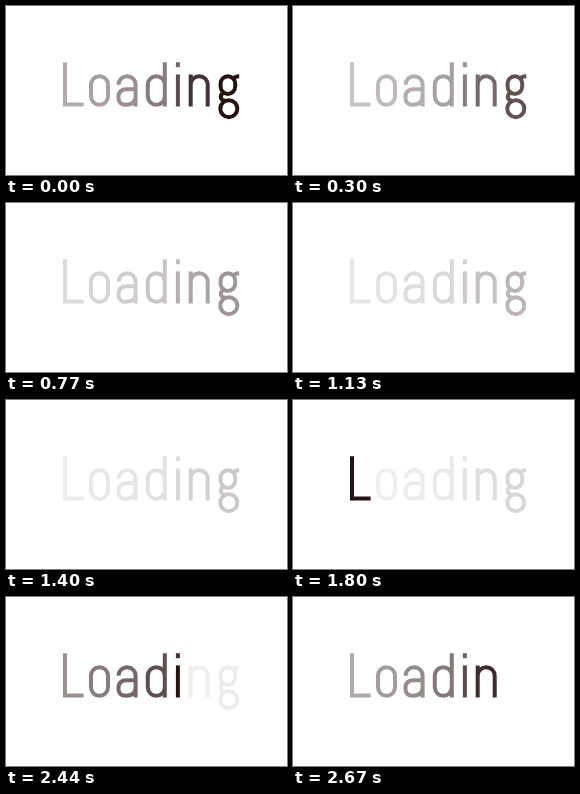
Recreate the animation shown at these times as an HTML page. Size 281 by 169 pixels, loop 2.7 s.

```html
<!DOCTYPE html>
<html lang="en">
<head>
<meta charset="utf-8">
<title>Loading</title>
<style>
  html, body { margin: 0; width: 100%; height: 100%; overflow: hidden; background: #fff; }
  svg { display: block; width: 100vw; height: 100vh; }
  path { fill: none; stroke: #251213; stroke-width: 4; }
</style>
</head>
<body>
<svg viewBox="0 0 281 169" role="img" aria-label="Loading"></svg>
<script>
  // Letter metrics: outer heights, then centre lines of round strokes
  const TOP = 56.2, MID = 68.4, BASE = 100.5;
  const HIGH = 70.2, LOW = 98.8, W = 17, R = W / 2;

  const stem = (x, top = MID, end = BASE) => `M${x} ${top}V${end}`;
  const arch = x => `M${x} ${HIGH + R}a${R} ${R} 0 0 1 ${W} 0`;
  const bowl = (x, top, end, w = W, r = w / 2) =>
    `M${x} ${top + r}a${r} ${r} 0 0 1 ${w} 0V${end - r}a${r} ${r} 0 0 1 ${-w} 0z`;
  const hook = x => arch(x) + `V${BASE}`;

  // Pen strokes in writing order; the dot of the i is written before its stem
  const strokes = [
    stem(59, TOP, LOW - 0.3) + 'H77.6',
    bowl(85, HIGH, LOW),
    hook(112.6) + 'M129.6 83.3H121q-8.6 0-8.6 7.9q0 7.6 7.4 7.6q9.8 0 9.8-8.5',
    bowl(141.8, HIGH, LOW) + stem(141.8 + W, TOP),
    stem(171.9, TOP, TOP + 5),
    stem(171.9),
    stem(184.7) + hook(184.7),
    bowl(214.6, HIGH, 87.9, 14.6) + 'M227 73.5q1.6-3.3 6.2-3.3M217.2 86.6q-3.2 2.6-2.2 5.6q.8 2.3 4 2.5' +
      bowl(214.3, 94.8, 110.6, W, 7.9)
  ];

  const LOOP = 2700, FADE = 950, WRITE = 1670, GAP = 30;
  const pace = (LOOP - GAP - WRITE) / (strokes.length - 1);
  const parts = strokes.map((d, i) => {
    const path = document.createElementNS('http://www.w3.org/2000/svg', 'path');
    path.setAttribute('d', d);
    document.querySelector('svg').append(path);
    const erased = WRITE + i * pace;
    return { path, erased, written: erased + GAP };
  });

  // The fade slows down: even steps first, then longer and longer holds
  const changes = [0, 100, 200, 300, 400, 500, 630, 770, 930, 1130, 1400];
  parts.forEach(p => changes.push(p.erased, p.written));

  function opacity({ erased, written }, t) {
    if (t >= erased && t < written) return 0;
    return Math.exp(-((t - written + LOOP) % LOOP) / FADE);
  }

  const start = performance.now();
  function draw() {
    const now = (performance.now() - start) % LOOP;
    const t = changes.filter(c => c <= now).pop();
    for (const p of parts) p.path.style.opacity = opacity(p, t);
    requestAnimationFrame(draw);
  }
  draw();
</script>
</body>
</html>
```
